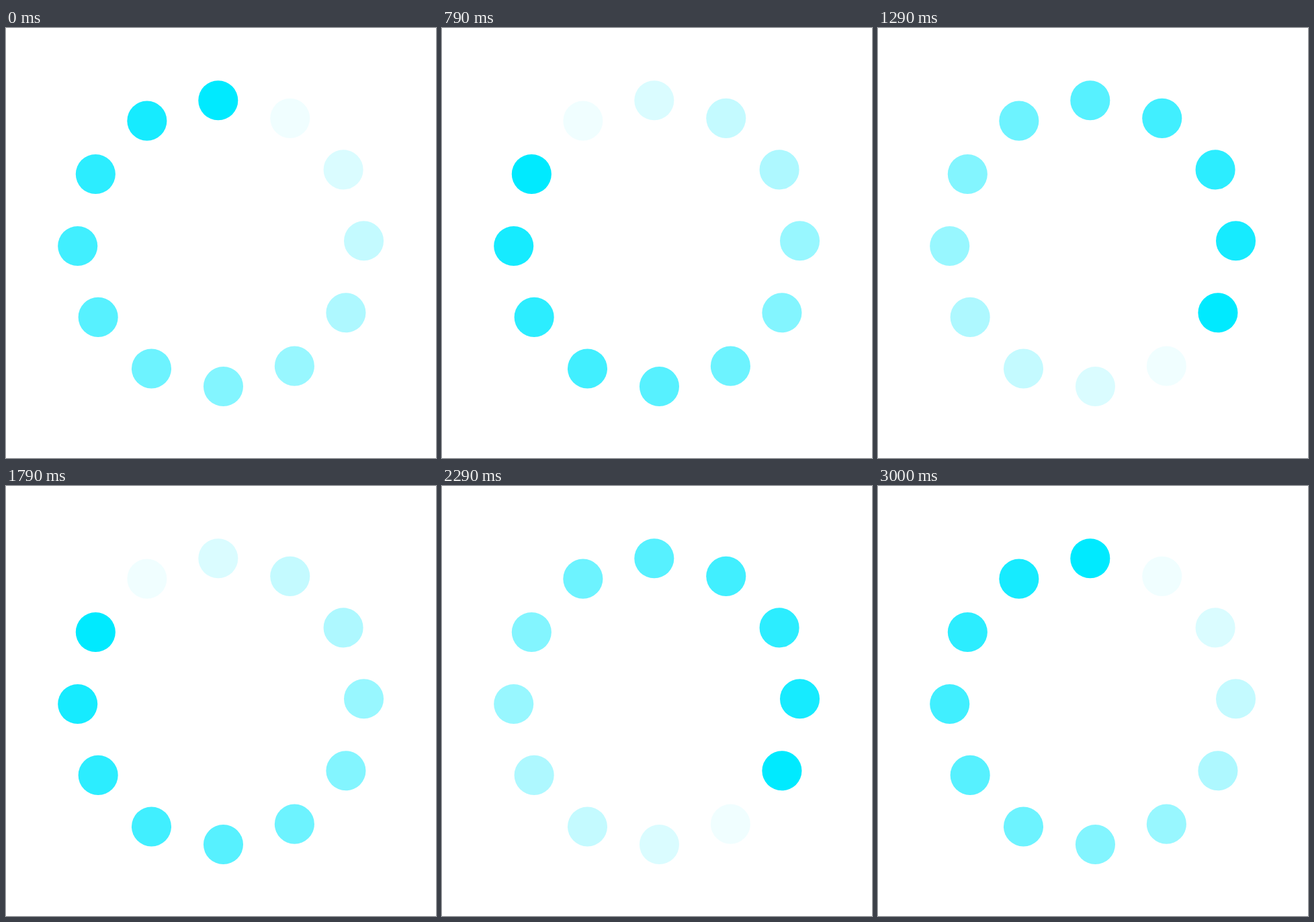
An HTML page for the animation above (3070 ms loop, 640x640 px).

```html
<!DOCTYPE html>
<html lang="en">
<head>
<meta charset="utf-8">
<title>Spinner</title>
<style>
  html, body { margin: 0; width: 100%; height: 100%; overflow: hidden; background: #fff; }
  svg { display: block; width: 100%; height: 100%; }
</style>
</head>
<body>
<svg id="stage" viewBox="0 0 640 640" fill="#00eaff"></svg>
<script>
const COUNT = 12;
const LOOP = 3070;
const TURN = 1000;
const CENTER = { x: 319.62, y: 320.65 };
const RING = 212.95;
const TILT = -1.03;
const FADE = 0.94 / (COUNT - 1);

// Time within a turn at which the head reaches each dot.
const STEPS = [0, 70, 140, 210, 290, 430, 500, 570, 640, 710, 790, 860];

const stage = document.getElementById('stage');

const dots = STEPS.map((_, i) => {
  const angle = (i * 360 / COUNT - 90 + TILT) * Math.PI / 180;
  const dot = document.createElementNS('http://www.w3.org/2000/svg', 'circle');
  dot.setAttribute('cx', (CENTER.x + RING * Math.cos(angle)).toFixed(2));
  dot.setAttribute('cy', (CENTER.y + RING * Math.sin(angle)).toFixed(2));
  dot.setAttribute('r', 29.55);
  return stage.appendChild(dot);
});

function draw(time) {
  const t = time % LOOP % TURN;
  const head = STEPS.filter(s => s <= t).length - 1;
  dots.forEach((dot, i) => {
    const lag = (head - i + COUNT) % COUNT;
    dot.setAttribute('fill-opacity', (1 - lag * FADE).toFixed(3));
  });
}

let start;
function tick(now) {
  start ??= now;
  draw(now - start);
  requestAnimationFrame(tick);
}

draw(0);
requestAnimationFrame(tick);
</script>
</body>
</html>
```
